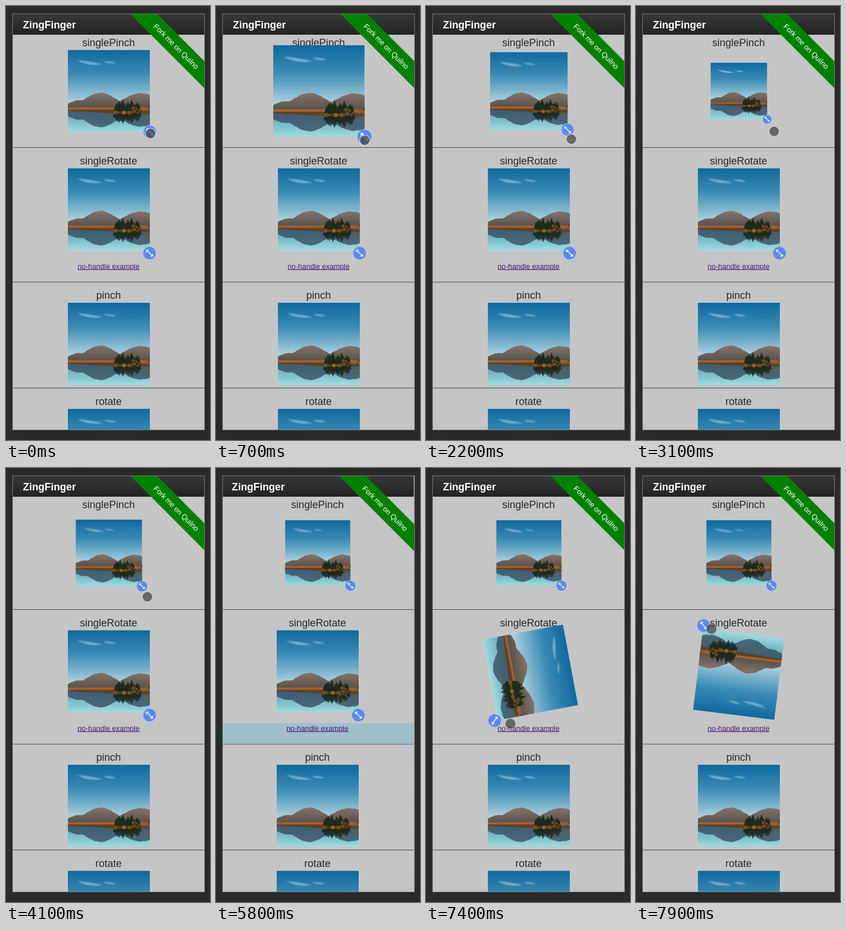
Write an HTML page that moves like this. It is 356 px wide and 756 px high and loops after 8 s.

```html
<!DOCTYPE html>
<html lang="en">
<head>
<meta charset="utf-8">
<title>ZingFinger</title>
<style>
  html, body { margin: 0; width: 100%; height: 100%; overflow: hidden; background: #282828; }
  svg { display: block; width: 356px; height: 756px; font-family: "Liberation Sans", Helvetica, Arial, sans-serif; }
  .heading { font-size: 18px; fill: #282828; text-anchor: middle; }
</style>
</head>
<body>
<svg viewBox="0 0 356 756">
  <defs>
    <linearGradient id="sky" x2="0" y2="1">
      <stop offset="0" stop-color="#0f699d"/><stop offset=".4" stop-color="#3a8bb5"/>
      <stop offset=".75" stop-color="#8fbfd4"/><stop offset="1" stop-color="#d2e4e8"/>
    </linearGradient>
    <linearGradient id="water" x2="0" y2="1">
      <stop offset="0" stop-color="#5f9cb2"/><stop offset=".6" stop-color="#80c2ce"/>
      <stop offset="1" stop-color="#a2dcdf"/>
    </linearGradient>
    <linearGradient id="rock" x2="0" y2="1">
      <stop offset="0" stop-color="#86746a"/><stop offset="1" stop-color="#514d49"/>
    </linearGradient>
    <linearGradient id="bar" x2="0" y2="1">
      <stop offset="0" stop-color="#383838"/><stop offset="1" stop-color="#222"/>
    </linearGradient>
    <pattern id="grain" width="7" height="5" patternUnits="userSpaceOnUse">
      <path d="M0 1H5M3 3.5H7" stroke="#383838" stroke-width=".7" opacity=".55"/>
    </pattern>
    <filter id="soft"><feGaussianBlur stdDeviation="1.1"/></filter>
    <clipPath id="photoBox"><rect width="143" height="143"/></clipPath>
    <clipPath id="screen"><rect x="11" y="13" width="336" height="726"/></clipPath>

    <path id="hills"/>
    <path id="trees"/>
    <g id="shrubs"></g>
    <g id="photo" clip-path="url(#photoBox)">
      <rect width="143" height="105" fill="url(#sky)"/>
      <path d="M16 18Q40 20 61 25Q36 29 16 18M61 20Q74 19 84 23Q73 25 61 20" fill="#c2dbe8" opacity=".55" filter="url(#soft)"/>
      <use href="#hills" fill="url(#rock)"/>
      <rect y="100" width="143" height="9" fill="#a1602f"/>
      <rect y="104.5" width="143" height="39" fill="url(#water)"/>
      <use href="#hills" transform="matrix(1 0 0 -1 0 209)" fill="#33495a" opacity=".75"/>
      <use href="#trees" transform="matrix(1 0 0 -.8 0 198)" fill="#1c2626" opacity=".85"/>
      <use href="#shrubs" transform="matrix(1 0 0 -1 0 221)" opacity=".3"/>
      <path d="M0 104H85L143 107V111H85L0 106Z" fill="#5f4127"/>
      <use href="#trees" fill="#1f2a1b"/>
      <use href="#shrubs"/>
    </g>
    <g id="handle">
      <circle r="11" fill="#5a88f5"/>
      <path d="M-4 -4L4 4" stroke="#fff" stroke-width="1.5"/>
      <path d="M-6 -6H-1L-6 -1ZM6 6H1L6 1Z" fill="#fff"/>
    </g>
  </defs>

  <rect width="356" height="756" fill="#282828"/>
  <rect width="356" height="756" fill="url(#grain)"/>
  <g clip-path="url(#screen)">
    <rect x="11" y="13" width="336" height="726" fill="#aaa"/>
    <g id="page">
      <rect x="9" y="13" width="338" height="726" fill="#c5c5c5"/>
      <path d="M9 246.5H347M9 481H347M9 665.5H347" stroke="#4c4c4c"/>
      <text class="heading" x="179" y="70">singlePinch</text>
      <text class="heading" x="179" y="276">singleRotate</text>
      <text class="heading" x="179" y="510">pinch</text>
      <text class="heading" x="179" y="695">rotate</text>
      <use href="#photo" x="108" y="517"/>
      <use href="#photo" x="108" y="701.5"/>
      <rect id="tap" x="9" y="444.5" width="338" height="36" fill="#9fbfca"/>
      <g id="rotator">
        <use href="#photo" x="-71.5" y="-74"/>
        <use href="#handle" x="71" y="74"/>
      </g>
      <text x="179" y="457.5" font-size="12.7" text-anchor="middle" fill="#4b1b80" text-decoration="underline">no-handle example</text>
      <g id="pincher">
        <use href="#photo" x="-71.5" y="-71.5"/>
        <use href="#handle" x="71.5" y="71.5"/>
      </g>
      <rect x="9" y="13" width="338" height="37" fill="url(#bar)"/>
      <rect x="9" y="13" width="338" height="37" fill="url(#grain)" opacity=".6"/>
      <text x="29.5" y="39" font-size="17.9" font-weight="bold" fill="#fff">ZingFinger</text>
      <path d="M216 13H263L349 99V146Z" fill="#008000"/>
      <text transform="translate(297 70.5) rotate(45)" y="4.5" font-size="12.8" text-anchor="middle" fill="#fff">Fork me on Quilno</text>
    </g>
  </g>
  <rect x="11.5" y="13.5" width="335" height="725" fill="none" stroke="#777"/>
  <circle id="cursor" r="9" stroke-width="1.6"/>
</svg>

<script>
const LOOP = 8000, STEP = 100, PHOTO = 143, SHORE = 104;
const el = id => document.getElementById(id);
const set = (id, attrs) => Object.entries(attrs).forEach(([k, v]) => el(id).setAttribute(k, v));
const clamp = p => Math.min(1, Math.max(0, p));
const part = (t, from, to) => clamp((t - from) / (to - from));
const ease = (t, from, to) => (1 - Math.cos(Math.PI * part(t, from, to))) / 2;
const mix = (a, b, p) => a.map((v, i) => v + (b[i] - v) * p);

let seed = 11;
const rnd = () => (seed = seed * 16807 % 2147483647) / 2147483647;

function buildLandscape() {
  const peak = (x, centre, height, width) => height * Math.exp(-(((x - centre) / width) ** 2));
  let ridge = `M0 ${SHORE}`, trees = "", shrubs = "";
  for (let x = 0; x <= PHOTO + 3; x += 3) {
    const height = Math.max(peak(x, 20, 16, 30), peak(x, 57, 29, 40), peak(x, 127, 28, 45));
    ridge += `L${x} ${SHORE - height - rnd()}`;
  }
  for (let x = 84; x < 124; x += 3) {
    const top = 86 + rnd() * 9;
    trees += `M${x} ${top}l3 9 2 15h-10l2 -15Z`;
  }
  for (let x = 82; x < PHOTO + 3; x += 2) {
    const y = x < 112 ? 109 : 100 + rnd() * 9, hue = 24 + rnd() * 12;
    shrubs += `<circle cx="${x}" cy="${y}" r="${1 + rnd() * 2.2}" fill="hsl(${hue} 55% ${20 + rnd() * 22}%)"/>`;
  }
  set("hills", { d: `${ridge}V${SHORE}Z` });
  set("trees", { d: trees });
  el("shrubs").innerHTML = shrubs;
}

// Spread out, squeeze in, then let go slightly.
const pinchScale = t => 1 + .5 * ease(t, 300, 1550) - .81 * ease(t, 1550, 2600)
  + .121 * ease(t, 3400, 4100) - .014 * ease(t, 4100, 4400);

const turn = t => part(t, 6500, 7900);
const rotation = t => 187 * turn(t) ** 1.94;

function pinchPoint(t) {
  const scale = pinchScale(t), lag = Math.sin(2 * part(t, 0, 4100));
  return [200.5 + 51.5 * scale + 5 * lag, 162 + 60 * scale + 15 * lag];
}

function rotatePoint(t) {
  const p = turn(t), radius = 103 - 13 * p;
  const angle = (46 + rotation(t) - 19 * Math.sin(3.4 * p)) * Math.PI / 180;
  return [179.5 + radius * Math.cos(angle), 356.5 + radius * Math.sin(angle)];
}

function cursorPoint(t) {
  const rest = [221, 403];
  return t < 5600 ? mix(pinchPoint(t), rest, ease(t, 4500, 5400))
                  : mix(rest, rotatePoint(t), ease(t, 5900, 6400));
}

function draw(t) {
  const [cx, cy] = cursorPoint(t);
  const hover = ease(t, 4400, 4700) - ease(t, 6100, 6400);
  const shift = 2 * (ease(t, 5800, 6100) - ease(t, 5600, 5800));
  set("pincher", { transform: `translate(179.5 148) scale(${pinchScale(t)})` });
  set("rotator", { transform: `translate(179.5 356.5) rotate(${rotation(t)})` });
  set("page", { transform: `translate(${shift})` });
  set("tap", { visibility: t >= 5700 && t < 6000 ? "visible" : "hidden" });
  set("cursor", {
    cx, cy, fill: "#424242", "fill-opacity": .72 - .65 * hover,
    stroke: hover > .5 ? "#666" : "#dedede", "stroke-opacity": t >= 6500 ? .25 : .75
  });
}

buildLandscape();
const start = performance.now();
function tick() {
  const t = (performance.now() - start) % LOOP;
  draw(Math.floor(t / STEP) * STEP);
  requestAnimationFrame(tick);
}
tick();
</script>
</body>
</html>
```
